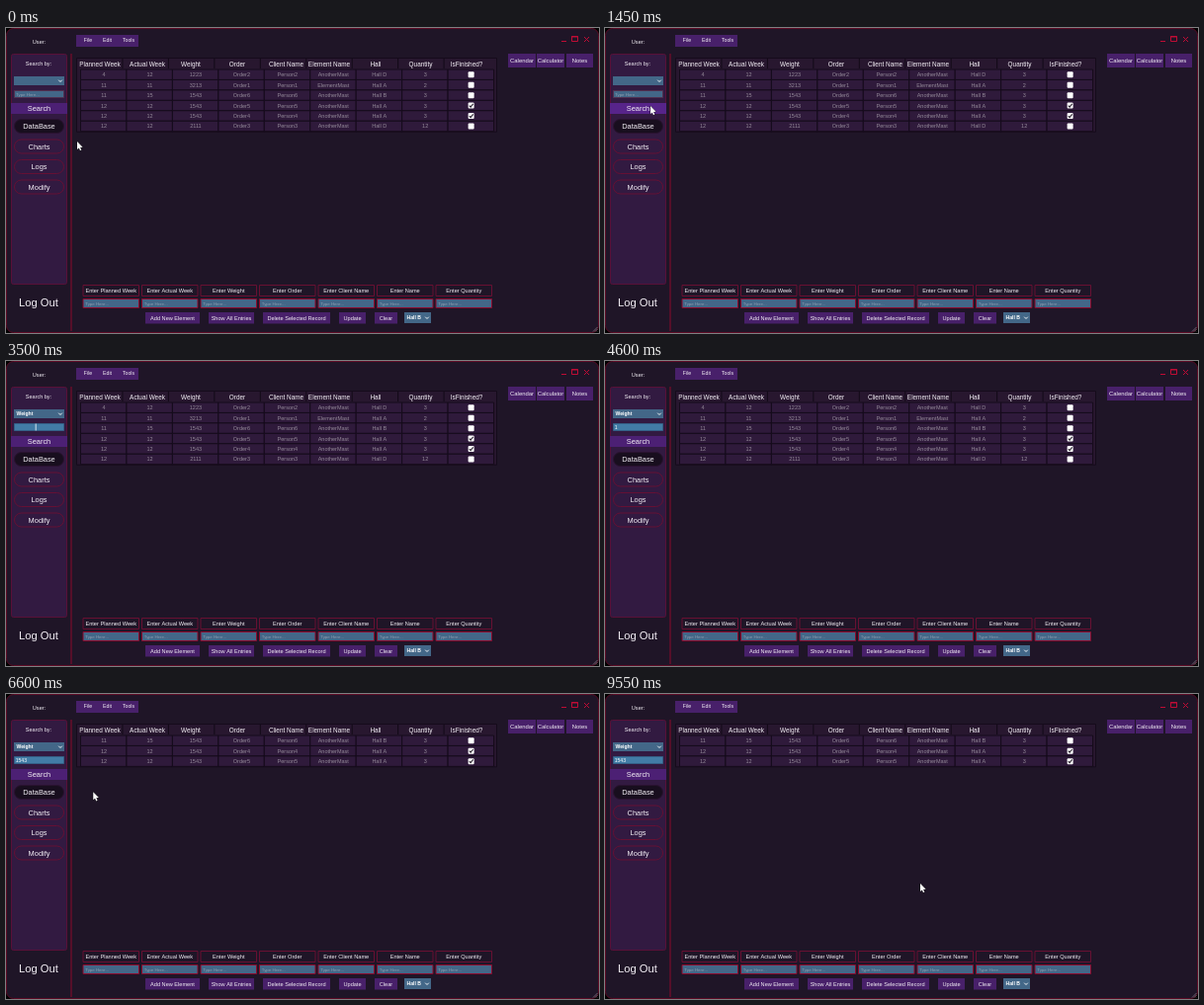
Write an HTML page with a canvas that moves like this. It is 600x309 px and loops after 9.95 s.

```html
<!DOCTYPE html>
<html lang="en">
<head>
<meta charset="utf-8">
<style>
  html, body { margin: 0; width: 100%; height: 100%; overflow: hidden; background: #000; }
  canvas { display: block; width: 600px; height: 309px; }
</style>
</head>
<body>
<canvas id="stage" width="600" height="309"></canvas>
<script>
const ctx = document.getElementById('stage').getContext('2d');
const LOOP = 9950, STEP = 50;
const RED = '#8c0a2c', PURPLE = '#48206a', STEEL = '#436788', DARK = '#150b1b';

const columns = ['Planned Week', 'Actual Week', 'Weight', 'Order', 'Client Name',
  'Element Name', 'Hall', 'Quantity', 'IsFinished?'];
const headerX = [95, 143, 187, 234, 283.5, 327, 374, 419.5, 466];
const record = (planned, actual, weight, id, hall, quantity, done, element = 'AnotherMast') =>
  [planned, actual, weight, 'Order' + id, 'Person' + id, element, 'Hall ' + hall, quantity, done];
const records = [
  record(4, 12, 1223, 2, 'D', 3, false),
  record(11, 11, 3213, 1, 'A', 2, false, 'ElementMast'),
  record(11, 15, 1543, 6, 'B', 3, false),
  record(12, 12, 1543, 5, 'A', 3, true),
  record(12, 12, 1543, 4, 'A', 3, true),
  record(12, 12, 2111, 3, 'D', 12, false)
];
const found = [records[2], records[4], records[3]];

// Pointer stops: time, x, y
const path = [
  [0, 72, 115], [750, 54, 54], [1250, 54, 54], [1450, 46, 79], [1600, 44, 96],
  [2250, 44, 96], [2750, 32, 84], [2950, 31, 83], [3250, 30, 67],
  [5700, 36, 67], [6050, 39, 78], [6300, 39, 78], [7200, 229, 160],
  [7300, 256, 162], [7450, 256, 162], [7700, 318, 192], [8050, 319, 192]
];
const typing = [[4600, '1'], [5350, '15'], [5500, '154'], [5750, '1543']];

function box(x, y, w, h, fill, stroke, radius = 0) {
  ctx.beginPath();
  ctx.roundRect(x, y, w, h, radius);
  if (fill) { ctx.fillStyle = fill; ctx.fill(); }
  if (stroke) { ctx.strokeStyle = stroke; ctx.stroke(); }
}

function text(str, x, y, size, color = '#f4f0f6', align = 'center', weight = '') {
  ctx.font = `${weight} ${size}px "Liberation Sans", Arial, sans-serif`;
  ctx.textAlign = align;
  ctx.fillStyle = color;
  ctx.fillText(str, x, y + size * 0.36);
}

function line(color, width, ...points) {
  ctx.strokeStyle = color;
  ctx.lineWidth = width;
  ctx.beginPath();
  points.forEach(([x, y]) => ctx.lineTo(x, y));
  ctx.stroke();
  ctx.lineWidth = 1;
}

function button(label, x, y, w, h, size = 5.6) {
  box(x, y, w, h, PURPLE);
  text(label, x + w / 2, y + h / 2, size);
}

function select(label, x, y, w, h) {
  box(x, y, w, h, STEEL);
  text(label, x + 2.5, y + h / 2, 5.1, '#fff', 'left', 'bold');
  const cx = x + w - 4, cy = y + h / 2;
  line('#fff', 0.9, [cx - 1.8, cy - 0.8], [cx, cy + 1], [cx + 1.8, cy - 0.8]);
}

function drawWindow() {
  ctx.fillStyle = '#000';
  ctx.fillRect(0, 0, 600, 309);
  box(0.5, 0.5, 599, 308, '#1f1527', '#5c0a24', 7);
  line(RED, 1, [66, 26], [66, 307]);
  text('User:', 33.5, 13.5, 5.6);
  box(71, 7, 63, 12, PURPLE);
  ['File', 'Edit', 'Tools'].forEach((s, i) => text(s, [83, 102.5, 124][i], 12.5, 5.2));
  line('#c00c35', 1, [562, 13.5], [567, 13.5]);
  box(572.5, 8.5, 6, 5, null, '#c00c35');
  line('#c00c35', 1, [572, 9], [579, 9]);
  line('#c00c35', 1, [585, 9], [590, 14]);
  line('#c00c35', 1, [590, 9], [585, 14]);
  button('Calendar', 508, 26, 28, 14, 5.9);
  button('Calculator', 537, 26, 28, 14, 5.9);
  button('Notes', 567, 26, 27, 14, 5.9);
  for (let i = 0; i < 3; i++) line('#8b838f', 0.7, [594 + i * 2, 307.5], [598.5, 303 + i * 2]);
}

function drawSidebar(t, pointer) {
  box(5.5, 26.5, 56, 233, '#321a41', '#591038', 2);
  text('Search by:', 33, 36.5, 5.5);
  select(t >= 2100 ? 'Weight' : '', 8, 49, 51, 9);

  const focused = t >= 3450;
  const typed = typing.filter(([start]) => t >= start).pop();
  box(8.5, 63.5, 50, 7, focused ? '#427ca6' : STEEL, focused ? '#345f86' : '#503050');
  if (typed) text(typed[1], 9.7, 67, 5.1, '#fff', 'left');
  else if (!focused) text('Type Here...', 10, 67, 4.4, '#8f9fb0', 'left');

  const hover = pointer.x < 62 && pointer.y > 75 && pointer.y < 88;
  box(5, 76, 57, 11, hover ? '#57248a' : '#4c2074');
  text('Search', 33.5, 81.5, 7.4);
  ['DataBase', 'Charts', 'Logs', 'Modify'].forEach((s, i) => {
    const y = 99.5 + i * 20.5;
    box(8.5, y - 7, 50, 14, i ? null : '#180e1e', i ? '#651034' : '#2a1230', 7);
    text(s, 33.5, y, 7.4);
  });
  text('Log Out', 33, 277.5, 11.2);
}

function drawTable(rows) {
  const pitch = 10.45, width = 46.45, left = 75.5, top = 42;
  box(71.5, 30.5, 425, 12 + rows.length * pitch, '#28172f', DARK);
  columns.forEach((s, i) => {
    text(s, headerX[i], 36.5, 6.4);
    if (i) line('#120a17', 1, [left + i * width - 4, 31], [left + i * width - 4, 41]);
  });
  rows.forEach((row, r) => row.forEach((value, c) => {
    const x = left + c * width, y = top + r * pitch, cx = x + width / 2 + 0.3, cy = y + pitch / 2;
    box(x, y, width, pitch, '#2f1a3b', DARK);
    if (typeof value !== 'boolean') return text(value, cx, cy, 5.5, '#958b9a');
    box(cx - 3, cy - 3, 6, 6, '#fff', null, 1);
    if (value) line('#29222e', 1.1, [cx - 1.8, cy], [cx - 0.5, cy + 1.5], [cx + 2, cy - 1.7]);
  }));
}

function drawForm() {
  ['Planned Week', 'Actual Week', 'Weight', 'Order', 'Client Name', 'Name', 'Quantity'].forEach((s, i) => {
    const x = 78 + i * 59.5;
    box(x, 260.5, 56.5, 11, null, '#681032');
    text('Enter ' + s, x + 28.2, 266, 5.65);
    box(x, 274.5, 56.5, 9, STEEL, RED);
    text('Type Here...', x + 2.2, 279.2, 4.4, '#8f9fb0', 'left');
  });
  [['Add New Element', 141, 55], ['Show All Entries', 205, 46], ['Delete Selected Record', 260, 68],
    ['Update', 337, 27], ['Clear', 373, 23]].forEach(([s, x, w]) => button(s, x, 288, w, 11.5));
  select('Hall B', 403, 288, 27, 11);
}

function pointerAt(t) {
  const next = path.findIndex(stop => stop[0] > t);
  if (next < 0) { const [, x, y] = path[path.length - 1]; return { x, y }; }
  const [t0, x0, y0] = path[next - 1], [t1, x1, y1] = path[next];
  const u = (t - t0) / (t1 - t0), k = u * u * (3 - 2 * u);
  return { x: x0 + (x1 - x0) * k, y: y0 + (y1 - y0) * k };
}

function drawPointer(t, { x, y }) {
  if (t >= 3900 && t < 5750) return;
  if (x < 59 && y > 63 && y < 72) {
    line('#fff', 0.8, [x, y - 3.5], [x, y + 3.5]);
    return;
  }
  ctx.beginPath();
  [[0, 0], [0, 8], [1.8, 6.4], [3, 9.2], [4.3, 8.6], [3.1, 5.9], [5.6, 5.8]]
    .forEach(([dx, dy]) => ctx.lineTo(x + dx, y + dy));
  ctx.closePath();
  ctx.lineWidth = 0.7;
  ctx.strokeStyle = '#111';
  ctx.stroke();
  ctx.fillStyle = '#fff';
  ctx.fill();
  ctx.lineWidth = 1;
}

function render(now) {
  const t = Math.floor((now % LOOP) / STEP) * STEP;
  const pointer = pointerAt(t);
  drawWindow();
  drawSidebar(t, pointer);
  drawTable(t >= 6250 ? found : records);
  drawForm();
  drawPointer(t, pointer);
}

const start = performance.now();
function tick() {
  render(performance.now() - start);
  requestAnimationFrame(tick);
}
tick();
</script>
</body>
</html>
```
